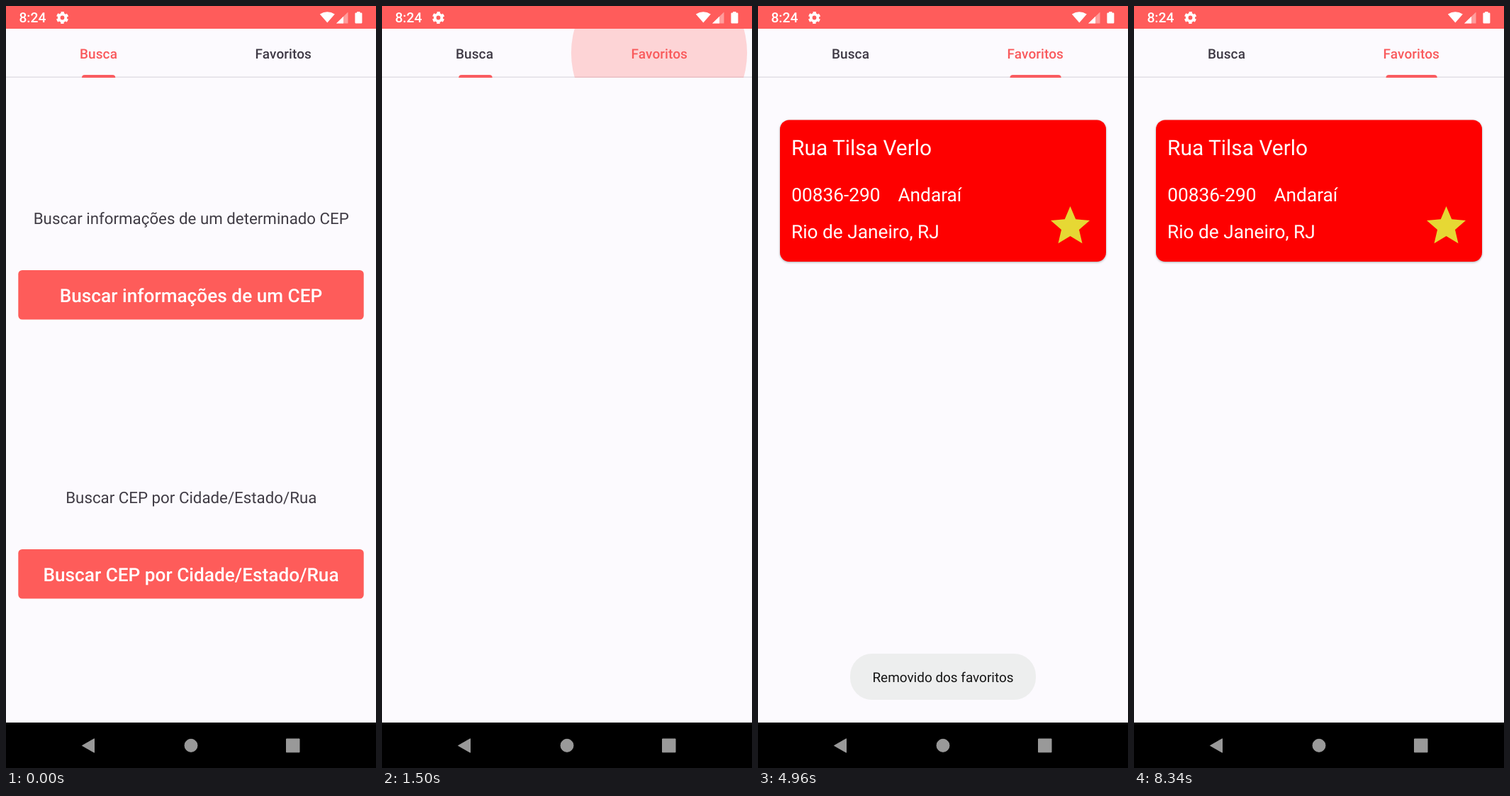
Write an HTML page that moves like this. It is 522 by 1073 pixels and loops after 8500 ms.

```html
<!DOCTYPE html>
<html lang="pt-BR">
<head>
<meta charset="utf-8">
<title>Busca de CEP</title>
<style>
  html, body { margin: 0; width: 100%; height: 100%; overflow: hidden; background: #fcfafe; }
  svg { display: block; width: 522px; height: 1073px; }
  text { font-family: Roboto, sans-serif; text-rendering: geometricPrecision; white-space: pre; }
  .mid { text-anchor: middle; }
  .med { font-weight: 500; }
  .label { font-size: 22.3px; fill: #403c45; }
  .button { font-size: 26.2px; fill: #fff; }
  .tab { font-size: 19px; letter-spacing: .1px; }
  .card text { font-size: 26.25px; fill: #fff; }
  .card .title { font-size: 29.9px; }
  .card rect { fill: #fe0000; filter: drop-shadow(0 1.5px 1.5px rgba(0, 0, 0, .32)); }
</style>
</head>
<body>
<svg viewBox="0 0 522 1073">
  <defs>
    <clipPath id="tabClip"><rect x="261" y="32" width="261" height="69"/></clipPath>
    <path id="star" d="M12 17.27 18.18 21 16.54 13.97 22 9.24 14.81 8.63 12 2 9.19 8.63 2 9.24 7.46 13.97 5.82 21Z"/>
  </defs>
  <rect width="522" height="1073" fill="#fcfafe"/>

  <g id="search"></g>
  <g id="cards"></g>

  <rect y="99.4" width="522" height="1.5" fill="#e3dfe6"/>
  <circle id="ripple" cx="391" cy="66" fill="#ff5c5a" clip-path="url(#tabClip)"/>
  <text id="tabSearch" class="tab med mid" x="130.5" y="74">Busca</text>
  <text id="tabFav" class="tab med mid" x="391.3" y="74">Favoritos</text>
  <path id="bar" fill="#f95c60"/>

  <g id="toast">
    <rect x="130" y="912" width="262" height="65" rx="31" fill="#edeeee"/>
    <text class="mid" x="261" y="952" font-size="18.95" fill="#151515">Removido dos favoritos</text>
  </g>

  <rect width="522" height="32" fill="#ff5c5b"/>
  <g fill="#fff">
    <text class="med" x="18.4" y="23.4" font-size="19.3">8:24</text>
    <g fill="none" stroke="#fff">
      <circle cx="79.5" cy="16.5" r="4.8" stroke-width="3.8"/>
      <circle cx="79.5" cy="16.5" r="7.2" stroke-width="2.8" stroke-dasharray="4.2 3.34" stroke-dashoffset="-1.67"/>
    </g>
    <path d="M453.3 23.6 442.8 11.6Q453.3 4.8 463.8 11.6Z"/>
    <path d="M466 24.5 482.5 8.5V24.5Z" opacity=".4"/>
    <path d="M466 24.5 476 14.8V24.5Z"/>
    <path d="M495.2 8H499.4V9.6H501.2Q502.4 9.6 502.4 10.8V23.2Q502.4 24.5 501.2 24.5H493.6Q492.4 24.5 492.4 23.2V10.8Q492.4 9.6 493.6 9.6H495.2Z"/>
  </g>

  <rect y="1009" width="522" height="64"/>
  <g fill="#999" stroke="#999" stroke-linejoin="round">
    <path d="M107.5 1041.5 124.5 1031.8V1051.2Z"/>
    <circle cx="261" cy="1041.3" r="9"/>
    <rect x="395.5" y="1032" width="18.5" height="18.8"/>
  </g>
</svg>
<script>
const LOOP = 8500;
const ACCENT = '#f95a5c', DARK = '#3f3a45';

// Moments of the interaction, in ms
const TAP = 1340, SELECT = 1460, LEAVE = 1475, SLIDE = 1490, LIST = 1580;
const REMOVED = [Infinity, 3950, 2950];
const TOASTS = [3000, 5000];

const $ = id => document.getElementById(id);
const clamp = u => Math.max(0, Math.min(1, u));
const ramp = (t, start, length) => clamp((t - start) / length);
const mix = (a, b, u) => a + (b - a) * u;
const smooth = u => u * u * (3 - 2 * u);
const show = (el, alpha) => el.setAttribute('opacity', alpha);

const panels = [
  ['Buscar informações de um determinado CEP', 'Buscar informações de um CEP'],
  ['Buscar CEP por Cidade/Estado/Rua', 'Buscar CEP por Cidade/Estado/Rua']
];
$('search').innerHTML = panels.map(([label, action], i) => `
  <g transform="translate(0 ${i * 393})">
    <text class="label mid" x="261.3" y="307">${label}</text>
    <rect x="17.3" y="372" width="487.4" height="69.5" rx="5.5" fill="#fe5c5a"/>
    <text class="button med mid" x="261" y="417">${action}</text>
  </g>`).join('');

const places = [
  ['Rua Tilsa Verlo', '00836-290', 'Andaraí'],
  ['Rua Orvane', '00836-475', 'Andaraí'],
  ['Caminho Orvane', '00942-630', 'Campo Grande']
];
$('cards').innerHTML = places.map(([street, code, area], i) => `
  <g class="card" transform="translate(0 ${i * 226.7})">
    <rect x="31" y="160.5" width="460" height="199.5" rx="13"/>
    <text class="title" x="47" y="209.5">${street}</text>
    <text x="47.3" y="275.3">${code}</text>
    <text x="197.5" y="275.3">${area}</text>
    <text x="47" y="327">Rio de Janeiro, RJ</text>
    <use href="#star" transform="translate(407.5 276.5) scale(2.75)" fill="#e6d834"/>
  </g>`).join('');
const cards = [...document.querySelectorAll('.card')];

function drawBar(u) {
  const left = mix(107, 355.5, u), right = mix(154.3, 427.7, u);
  $('bar').setAttribute('d',
    `M${left} 101Q${left} 97 ${left + 4} 97H${right - 4}Q${right} 97 ${right} 101Z`);
}

function render(t) {
  const fav = t >= SELECT;
  $('tabSearch').setAttribute('fill', fav ? DARK : ACCENT);
  $('tabFav').setAttribute('fill', fav ? ACCENT : DARK);
  drawBar(smooth(ramp(t, SLIDE, 270)));

  const grow = ramp(t, TAP, 225);
  $('ripple').setAttribute('r', 135 * (1 - (1 - grow) ** 2));
  show($('ripple'), 0.24 * ramp(t, TAP, 75) * (1 - ramp(t, 1565, 200)));

  show($('search'), t < LEAVE ? 1 : 0);
  show($('cards'), t < LIST ? 0 : 1);
  cards.forEach((card, i) => show(card, 1 - ramp(t, REMOVED[i], 120)));

  // Overlapping toasts blend into one
  const clear = TOASTS.reduce((rest, start) =>
    rest * (1 - ramp(t, start, 250) * (1 - ramp(t, start + 2000, 400))), 1);
  show($('toast'), 1 - clear);
}

const begin = performance.now();
function tick() {
  render((performance.now() - begin) % LOOP);
  requestAnimationFrame(tick);
}
tick();
</script>
</body>
</html>
```
